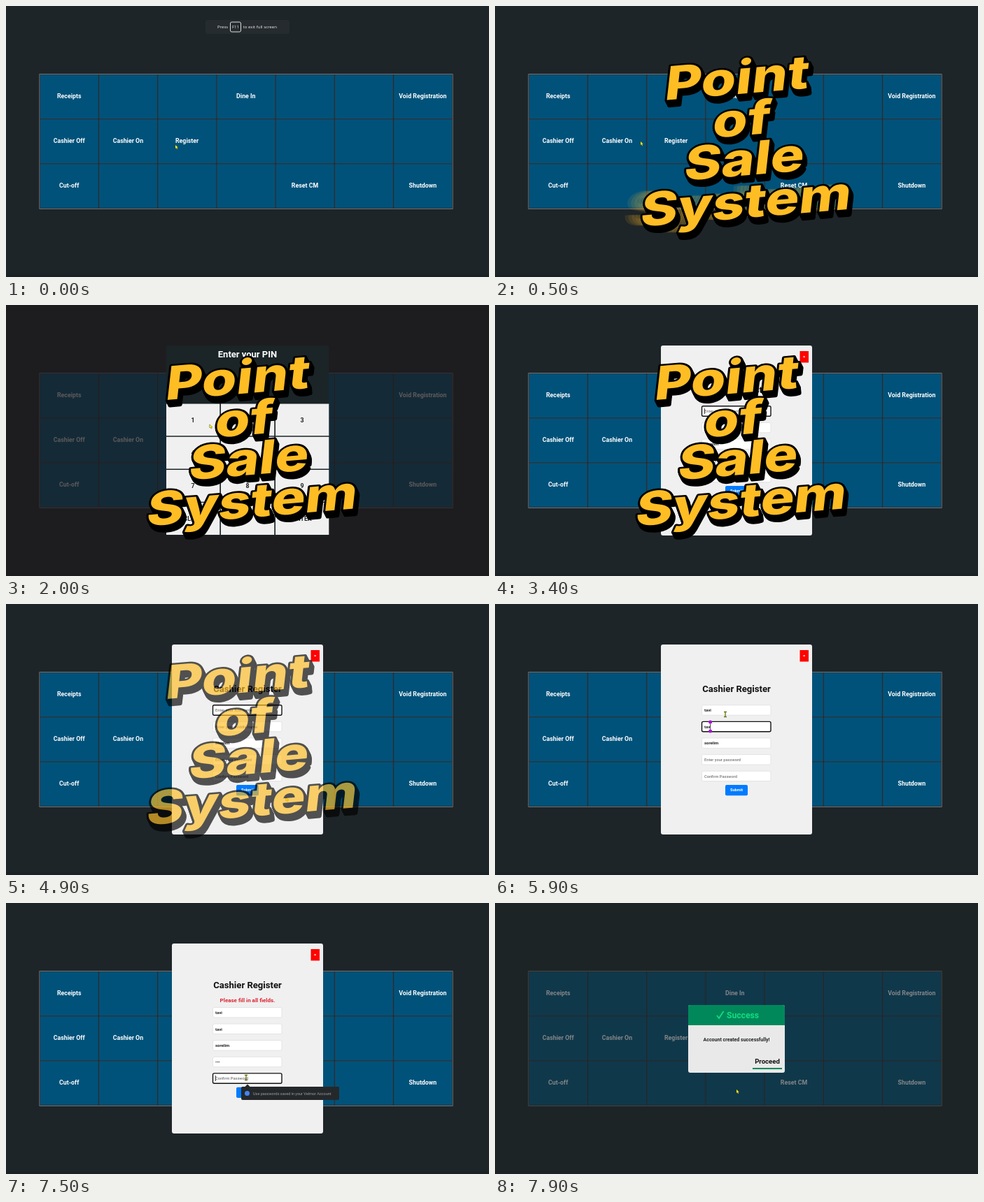
These frames come from a looping animation (690x388 px, 8 s). An HTML page with a canvas:

```html
<!DOCTYPE html>
<html lang="en">
<head>
<meta charset="utf-8">
<title>Point of Sale System</title>
<style>
html, body { margin: 0; width: 100%; height: 100%; overflow: hidden; background: #1e2528; }
canvas { position: absolute; left: 0; top: 0; width: 100vw; height: 100vh; }
</style>
</head>
<body>
<canvas id="stage" width="690" height="388"></canvas>
<canvas id="title" width="690" height="388"></canvas>
<script>
const titleLayer = document.getElementById('title');
const c = document.getElementById('stage').getContext('2d');
const tc = titleLayer.getContext('2d');
const LOOP = 8000;
const UI = 'Roboto, sans-serif';
const FIRST = 'tavi', LAST = 'sorelim';

const LABELS = [
  ['Receipts', '', '', 'Dine In', '', '', 'Void Registration'],
  ['Cashier Off', 'Cashier On', 'Register', '', '', '', ''],
  ['Cut-off', '', '', '', 'Reset CM', '', 'Shutdown']
];
const KEYS = ['1', '2', '3', '4', '5', '6', '7', '8', '9', 'CLEAR', '0', 'ENTER'];
const HINTS = ['Enter your first name', 'Enter your middle name', 'Enter your last name',
  'Enter your password', 'Confirm Password'];

// word, centre x, baseline y, start time
const TITLE = [
  ['Point', 329, 127.5, 66], ['of', 338, 186.5, 122],
  ['Sale', 345, 243.5, 150], ['System', 349.5, 304, 164]
];

// time, x, y
const POINTER = [
  [0, 242, 199], [100, 242, 199], [500, 208, 194], [900, 88, 196], [1000, 86, 196],
  [1500, 258, 204], [1800, 262, 204], [2000, 291, 171], [2100, 267, 168], [2250, 345, 168],
  [2400, 345, 215], [2600, 422, 305], [2800, 400, 277], [5550, 400, 277], [5800, 329, 158],
  [6400, 329, 158], [6600, 345, 266], [6700, 345, 266], [6900, 340, 228], [7200, 340, 228],
  [7300, 343, 250], [7550, 343, 250], [7700, 345, 267], [8000, 345, 267]
];

const ramp = (t, a, b) => Math.min(1, Math.max(0, (t - a) / (b - a)));
const typed = (t, start, step, max) => Math.min(max, Math.max(0, Math.floor((t - start) / step)));

function box(x, y, w, h, fill, r = 0, line) {
  c.beginPath();
  c.roundRect(x, y, w, h, r);
  if (fill) { c.fillStyle = fill; c.fill(); }
  if (line) { c.strokeStyle = line; c.stroke(); }
}

function disc(x, y, r, fill) {
  c.beginPath();
  c.arc(x, y, r, 0, 7);
  c.fillStyle = fill;
  c.fill();
}

function text(s, x, y, size, fill, weight = 700, align = 'center', family = UI) {
  c.font = `${weight} ${size}px ${family}`;
  c.textAlign = align;
  c.textBaseline = 'middle';
  c.fillStyle = fill;
  c.fillText(s, x, y + 0.5);
  return c.measureText(s).width;
}

function faded(alpha, draw) {
  if (alpha <= 0) return;
  c.save();
  c.globalAlpha = alpha;
  draw();
  c.restore();
}

function grid() {
  box(0, 0, 690, 388, '#1e2528');
  box(0, 384, 690, 4, '#1b2225');
  c.lineWidth = 1;
  box(47.8, 97.5, 590.4, 193, '#1c2a33', 0, '#6b7275');
  LABELS.forEach((row, j) => row.forEach((label, i) => {
    const x = 49 + i * 84.2, y = 98.6 + j * 64;
    c.lineWidth = 0.5;
    box(x, y, 82.8, 62.6, '#00527a', 0, '#2c4756');
    text(label, x + 41.2, y + 30.8, 8.8, '#fff');
  }));
}

function notice() {
  const font = '"Open Sans", sans-serif';
  box(285, 20, 120, 20, '#252b2e', 3);
  text('Press', 302, 29.5, 6.1, '#eee', 400, 'left', font);
  c.lineWidth = 1;
  box(320.5, 23, 15, 14, null, 2, '#ddd');
  text('F11', 328, 29.5, 6.1, '#eee', 400, 'center', font);
  text('to exit full screen', 338.5, 29.5, 6.1, '#eee', 400, 'left', font);
}

function pinPad(t) {
  box(229, 58, 232, 272, '#1b2427', 2);
  text('Enter your PIN', 345, 71, 13, '#fff');
  text('•'.repeat(typed(t, 2100, 130, 4)), 345, 108, 14, '#fff');
  KEYS.forEach((key, i) => {
    const x = 229 + i % 3 * 78, y = 141.5 + Math.floor(i / 3) * 47.2;
    box(x, y, 76.3, 45.8, '#f0f0f0');
    text(key, x + 38, y + 23, 8.8, '#222');
  });
}

function focusAt(t) {
  if (t < 5700) return [0, 3350];
  if (t < 6600) return [1, 5700];
  if (t < 6880) return [-1, 0];
  if (t < 7280) return [3, 6880];
  return t < 7680 ? [4, 7280] : [-1, 0];
}

function valuesAt(t) {
  const first = t < 5350 ? 0 : t < 5560 ? 3 : 4;
  const middle = typed(t, 5610, 90, 4);
  return [FIRST.slice(0, first), FIRST.slice(0, middle), LAST,
    '•'.repeat(typed(t, 6900, 80, 3)), '•'.repeat(typed(t, 7540, 40, 3))];
}

const fieldY = (i, t) => 152 + i * 23.6 + (t >= 6650 ? 4.7 : 0);

function register(t) {
  const error = t >= 6650, shift = error ? 4.7 : 0;
  box(237, 58, 216, 272, '#f0f0f0', 3);
  box(435.5, 66, 12.5, 16.5, '#f00');
  text('×', 441.7, 73.5, 6, '#fff');
  text('Cashier Register', 345, 122 - shift, 13.1, '#111');
  if (error) text('Please fill in all fields.', 345, 139.5, 8, '#dc2430');

  const [focus, since] = focusAt(t);
  valuesAt(t).forEach((value, i) => {
    const y = fieldY(i, t), on = i === focus;
    c.lineWidth = on ? 1.4 : 0.7;
    box(295.5, y - 7.2, 98.5, 14.4, '#fff', 2, on ? '#111' : '#dcdcdc');
    const w = value ? text(value, 299, y, 6, '#222', 700, 'left') : 0;
    if (!value) text(HINTS[i], 299, y, 5.7, '#777', 500, 'left');
    if (!on) return;
    const typing = t > 5350 && i < 2 && t < 6150;
    const x = 299.4 + w;
    if (typing || Math.floor((t - since) / 300) % 2 === 0) box(x - 0.4, y - 4, 0.8, 8, '#111');
    if (typing) {
      disc(x, y - 6.5, 2.5, '#a516cf');
      disc(x, y + 6.5, 2.5, '#a516cf');
    }
  });

  box(329, 259 + shift, 32, 15.3, '#007bff', 2);
  text('Submit', 345, 266 + shift, 5.7, '#fff');
  if (focus > 2) hint(fieldY(focus, t) + 21.4);
}

function hint(y) {
  c.fillStyle = '#25282b';
  c.beginPath();
  c.moveTo(341, y - 9);
  c.lineTo(345, y - 13);
  c.lineTo(349, y - 9);
  c.fill();
  box(336, y - 9.5, 140, 19, '#25282b', 2);
  disc(344.5, y, 3.5, '#4285f4');
  text('Use passwords saved in your Velmor Account', 353, y, 5.5, '#9a9fa2', 400, 'left');
}

function success() {
  box(276, 146, 138, 97, '#e9e9e9', 3);
  box(276, 146, 138, 29, '#00885a', [3, 3, 0, 0]);
  c.strokeStyle = '#12dc80';
  c.lineWidth = 1.8;
  c.beginPath();
  c.moveTo(317, 161);
  c.lineTo(320, 165);
  c.lineTo(326.5, 155);
  c.stroke();
  text('Success', 354, 160.5, 12.2, '#12dc80');
  text('Account created successfully!', 345, 195, 7, '#222');
  text('Proceed', 389, 227, 9.6, '#111');
  box(368, 236, 42, 2, '#00885a');
}

function pointer(t) {
  const k = Math.max(1, POINTER.findIndex(p => p[0] > t));
  const [t0, x0, y0] = POINTER[k - 1], [t1, x1, y1] = POINTER[k];
  const u = ramp(t, t0, t1), e = u * u * (3 - 2 * u);
  const x = x0 + (x1 - x0) * e, y = y0 + (y1 - y0) * e;
  const inField = t > 2850 && t < 7750 && x > 295 && x < 394 &&
    HINTS.some((_, i) => Math.abs(fieldY(i, t) - y) < 8);
  c.save();
  c.translate(x, y);
  c.beginPath();
  if (inField) {
    c.moveTo(-2, -3.5); c.lineTo(2, -3.5);
    c.moveTo(0, -3.5); c.lineTo(0, 3.5);
    c.moveTo(-2, 3.5); c.lineTo(2, 3.5);
    c.strokeStyle = '#6d7414';
    c.lineWidth = 1.3;
    c.stroke();
  } else {
    c.scale(0.9, 0.9);
    for (const [px, py] of [[0, 0], [0, 5.5], [1.3, 4.5], [2.3, 6.6], [3.3, 6.1], [2.4, 4.1], [4, 4]]) c.lineTo(px, py);
    c.closePath();
    c.strokeStyle = '#3a3a10';
    c.lineWidth = 0.8;
    c.stroke();
    c.fillStyle = '#f4ea1c';
    c.fill();
  }
  c.restore();
}

// Slide from the left with a small overshoot
const slide = (t, start) => {
  const v = ramp(t, start, start + 700) - 1;
  return 240 * (2.3 * v ** 3 + 1.3 * v * v);
};

function letters(word, x, y, outline) {
  tc.save();
  tc.translate(x, y);
  tc.rotate(-4.8 * Math.PI / 180);
  tc.transform(1.22, 0, -0.2, 1, 0, 0);
  if (outline) tc.strokeText(word, 0, 0);
  else tc.fillText(word, 0, 0);
  tc.restore();
}

function title(t) {
  titleLayer.style.opacity = 1 - ramp(t, 4750, 5200);
  tc.clearRect(0, 0, 690, 388);
  tc.font = '800 66px Inter, sans-serif';
  tc.textAlign = 'center';
  tc.lineJoin = 'round';
  tc.lineWidth = 5;
  tc.strokeStyle = '#000';
  tc.fillStyle = '#ffbd24';
  for (const [word, x, y, start] of TITLE) {
    const alpha = ramp(t, start, start + 120);
    if (!alpha) continue;
    const d = slide(t, start);
    const speed = d - slide(t - 10, start);
    const wx = x + d, wy = y - d * 0.084;
    tc.globalAlpha = alpha * Math.min(0.15, Math.max(0, (speed - 1.6) * 0.4));
    if (tc.globalAlpha > 0) for (let i = 1; i < 6; i++) letters(word, wx - i * 5, wy);
    tc.globalAlpha = alpha;
    for (let i = 8; i >= 0; i--) letters(word, wx + i * 0.5, wy + i, true);
    letters(word, wx, wy);
  }
  tc.globalAlpha = 1;
}

function draw(now) {
  const t = now % LOOP;
  grid();
  faded(1 - ramp(t, 100, 320), notice);
  faded(0.72 * ramp(t, 1780, 1980) * (1 - ramp(t, 2750, 3050)), () => box(0, 0, 690, 388, '#1e1b1e'));
  faded(ramp(t, 1740, 1900) * (1 - ramp(t, 2680, 2800)), () => pinPad(t));
  if (t < 7750) faded(ramp(t, 2830, 3050), () => register(t));
  faded(0.55 * ramp(t, 7750, 7900), () => box(0, 0, 690, 388, '#1e2426'));
  faded(ramp(t, 7750, 7880), success);
  pointer(t);
  title(t);
  requestAnimationFrame(draw);
}
requestAnimationFrame(draw);
</script>
</body>
</html>
```
